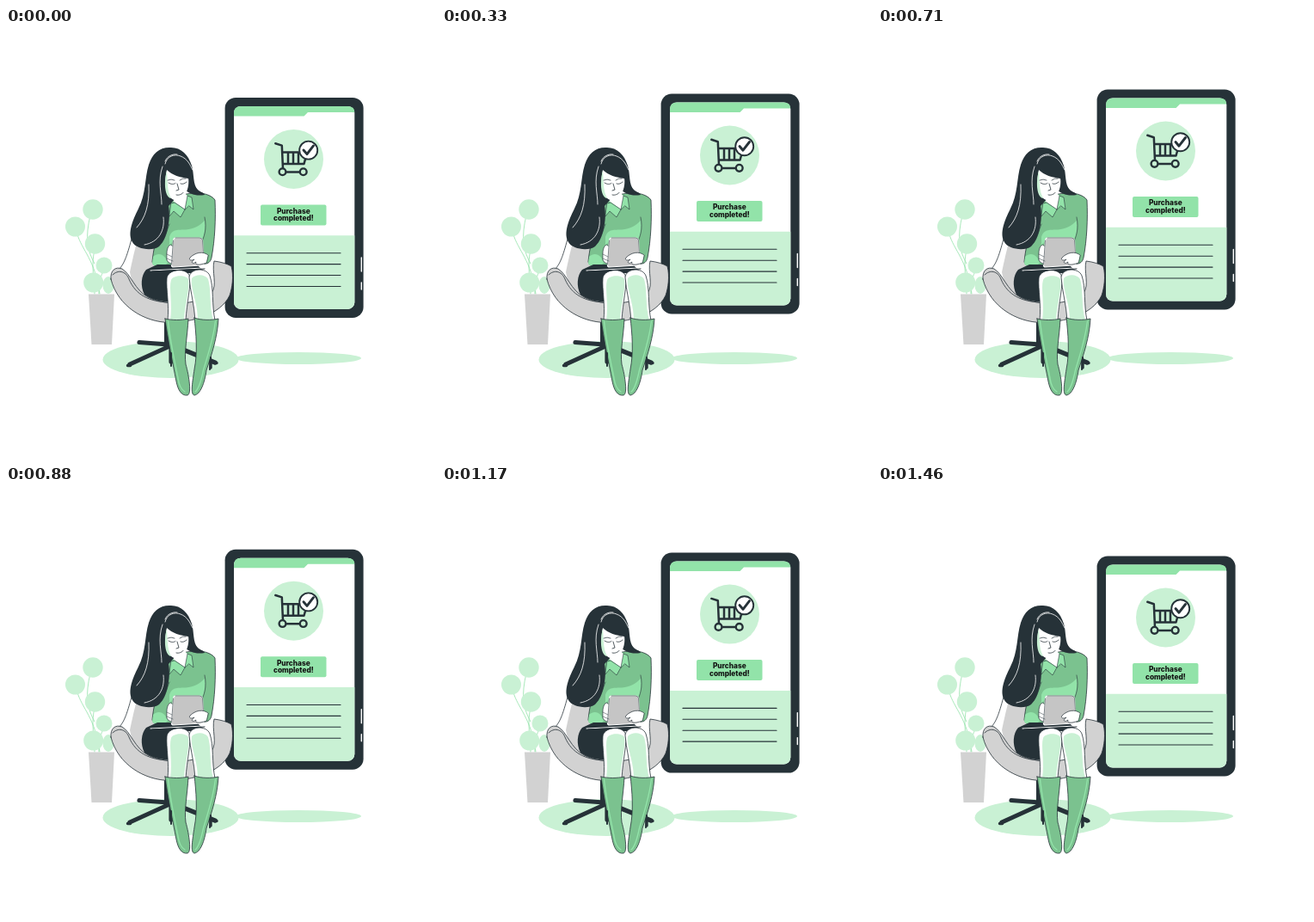
An HTML page with a canvas for the animation above (1.5 s loop, 500 px wide and 500 px high).

```html
<!DOCTYPE html>
<html lang="en">
<head>
<meta charset="utf-8">
<title>Purchase completed</title>
<style>
html, body { margin: 0; width: 100%; height: 100%; overflow: hidden; background: #fff; }
canvas { display: block; width: 500px; height: 500px; }
</style>
</head>
<body>
<canvas id="stage"></canvas>
<script>
const canvas = document.getElementById('stage');
const ctx = canvas.getContext('2d');
const ratio = window.devicePixelRatio || 1;
canvas.width = canvas.height = 500 * ratio;

const INK = '#263238', GREEN = '#92e3a9', PALE = '#c9f1d4', MID = '#7bc28f', GREY = '#d2d2d2', WHITE = '#fff';
const LOOP = 1500, STEPS = 36, RISE = 10, REST = 0.5;

function shape(d, fill, stroke, width = 0.8) {
  const path = new Path2D(d);
  if (fill) { ctx.fillStyle = fill; ctx.fill(path); }
  if (stroke) { ctx.strokeStyle = stroke; ctx.lineWidth = width; ctx.stroke(path); }
}
const line = (d, color = INK, width = 0.8) => shape(d, null, color, width);

function oval(x, y, rx, ry, fill, stroke, width) {
  ctx.beginPath();
  ctx.ellipse(x, y, rx, ry, 0, 0, Math.PI * 2);
  if (fill) { ctx.fillStyle = fill; ctx.fill(); }
  if (stroke) { ctx.strokeStyle = stroke; ctx.lineWidth = width; ctx.stroke(); }
}
const disc = (x, y, r, fill, stroke, width) => oval(x, y, r, r, fill, stroke, width);

function panel(x, y, w, h, r, fill) {
  ctx.beginPath();
  ctx.roundRect(x, y, w, h, r);
  ctx.fillStyle = fill;
  ctx.fill();
}

function drawGround() {
  oval(340, 384, 73, 7, PALE);
  oval(191.5, 385.5, 79, 21.5, PALE);
}

function drawPlant() {
  line('M83 240C88 258 104 270 109 309M98 218C92 243 94 258 103 274M103 258C99 275 102 285 103 309M113 283C108 293 108 300 108 309', GREEN);
  disc(80.5, 231, 11.5, PALE);
  disc(101, 211, 11.7, PALE);
  disc(103.5, 251, 11.7, PALE);
  disc(114, 276, 9.5, PALE);
  disc(101.7, 296, 11.5, PALE);
  oval(119, 299, 6.5, 10, PALE);
  shape('M96 309.5H126L123 368H99.5Z', GREY);
}

function drawCart() {
  line('M313.3 134.3L320.8 136.7L322 163.5M322 144.5H340M322 158H346.5L348.5 151M328 145V157M334 145V157M340 145V157', INK, 2.5);
  line('M325 167.5H342', INK, 2.5);
  disc(321.5, 167.3, 3.9, PALE, INK, 2.4);
  disc(345.7, 167.3, 3.9, PALE, INK, 2.4);
  disc(351.7, 142.2, 10.5, WHITE, INK, 1.9);
  line('M346 142L350 146.7L357.5 137', INK, 2.9);
}

function drawPhone(rise) {
  ctx.save();
  ctx.translate(0, REST - rise);
  panel(254.6, 81, 161, 256, 12.5, INK);
  panel(265, 91, 140.3, 236, 8, WHITE);
  shape('M265 102.5V99Q265 91 273 91H397.3Q405.3 91 405.3 98H351L346.5 102.5Z', GREEN);
  panel(265, 241.3, 140.3, 85.7, [0, 0, 8, 8], PALE);
  line('M413.3 267V283M413.3 296V304', WHITE, 1.4);
  disc(334.5, 152.5, 34.5, PALE);
  drawCart();
  panel(296, 205.5, 76.5, 24, 2, GREEN);
  ctx.fillStyle = '#111';
  ctx.font = '800 8.3px Inter, sans-serif';
  ctx.textAlign = 'center';
  ctx.fillText('Purchase', 334.3, 215.8);
  ctx.fillText('completed!', 334.3, 224.2);
  for (let i = 0; i < 4; i++) line(`M280 ${261.8 + i * 12.9}H389`, INK, 1.1);
  ctx.restore();
}

function drawChair() {
  shape('M184 340H194V365L190 370H184Z', INK);
  line('M155 365.5L188 368M144 391L188 371M192 370V388M191 368L243 389', INK, 5.2);
  line('M141.5 392.5H144.5M238 386V395M243 389.5H245', INK, 3.4);
  shape('M148 238C142 260 139 272 132 280L165 315L187 290L172 250Z', WHITE, INK);
  shape('M152 250C148 264 146 275 144 284C147 300 155 308 165 313L187 290L172 250Z', GREY);
  shape('M122 292C121 282 127 277 135 280C146 287 149 304 165 313C188 324 224 322 239 308C246 299 239 283 242 271C250 272 257 274 262 277C265 289 263 302 260 311C249 334 216 342 190 342.5C161 342 130 324 122 292Z', GREY, INK);
  line('M124 287C130 281 139 282 143 292C151 311 167 318 188 319');
}

function drawBody() {
  shape('M163 281C157 288 156 300 161 310C170 317 184 319 193 318L200 286L231 284L222 275H176Z', INK);
  // legs
  shape('M188 340C190 321 186 304 187 291C188 281 207 278 213 287C216 299 210 319 209 340Z', WHITE, INK);
  shape('M191 340C194 320 189 303 192 293C195 287 209 287 212 292C214 303 208 322 207 340Z', PALE);
  shape('M220 340C219 322 214 305 213 290C214 279 233 278 237 288C242 303 239 321 243 340Z', WHITE, INK);
  shape('M223 340C223 318 214 303 216 291C221 286 231 286 235 292C239 306 236 322 241 340Z', PALE);
  // boots
  shape('M185 338C193 340 204 340 212 338C211 359 207 376 209 391C213 405 216 426 211 427C204 428 200 421 198 411C194 390 188 362 185 338Z', MID, INK);
  line('M188.5 341C191 365 196 387 200 407C201 415 203 420 208 423', GREEN, 1.4);
  shape('M219 337C227 340 239 340 247 338C246 359 239 380 233 398C231 413 226 426 219 427C214 426 217 411 219 397C223 377 221 355 219 337Z', MID, INK);
  line('M243.5 341C241 363 234 382 229.5 398C227 410 224 420 220 423', GREEN, 1.4);
  line('M192 378V393M238 383L237 397', INK, 2);
}

function drawTorso() {
  shape('M186 205C194 196 206 193 218 192C228 191 239 194 243 200C244 222 243 246 239 267C237 277 226 275 222 271L193 276C183 280 172 279 170 272C171 259 176 240 178 222Z', MID, INK);
  shape('M190 243C193 233 201 235 209 234.5C219 234 226 229 231 224C233 236 229 246 226 249V244L196 245L190 254Z', GREEN);
  shape('M171 266C179 259 186 266 188 273C183 279 174 280 170 274Z', GREEN);
  line('M181 250C186 243 187 235 190 228M231 220C234 234 230 244 227 250', INK, 0.6);
  shape('M194 201L208 192L213 198L208 211Z', WHITE);
  shape('M192 204L196 203L208 211L203 220L195 213L190 219Z', GREEN, INK, 0.6);
  shape('M208 211L211 195L216 197L218 211L213 207Z', GREEN, INK, 0.6);
}

function drawHair() {
  shape('M190 139C203 138 212 147 216 160C219 170 217 182 223 188C226 191 230 191 231 194C221 196 213 193 207 187L189 207C192 223 187 246 178 254C170 260 151 257 147 249C141 239 147 224 154 210C163 193 161 175 166 159C170 146 178 139 190 139Z', INK);
  shape('M187 165C184 177 185 190 190 196C195 202 202 202 206 197C212 190 213 180 212 175C203 174 193 171 187 165Z', WHITE);
  shape('M187 166C183 181 185 197 192 198C187 189 188 178 187 166Z', PALE);
  line('M189 180C192 182 195 182 197 180.5M203 181C205 182 208 181 210 179M199 181L201 188L198 189M198 194C201 195 205 193 206 191.5', INK, 0.8);
  line('M188 177Q192 175 196 177M202 177Q206 174 209 175', INK, 0.7);
  line('M185 158C187 149 196 146 203 149C211 152 214 159 217 165M185 155C187 149 194 146 199 147M182 161C176 178 181 192 181 205M166 182C167 206 162 221 152 232M183 220C185 235 178 249 161 252', WHITE, 0.8);
}

function drawTablet() {
  shape('M191 252C186 255 187 263 187 270C190 275 195 275 198 271L195 255Z', WHITE, INK, 0.7);
  shape('M197 244L225 244Q228 244 228.5 247L230 273Q230 276 227 276L195 278Q192 278 192.5 275L194.5 247Q195 244 197 244Z', '#c5c5c5', WHITE, 1.2);
  line('M197 244L225 244Q228 244 228.5 247L230 273M192.5 275L194.5 247', INK, 0.6);
  shape('M235 264C229 259 220 261 214 267C212 270 216 271 219 269C214 273 217 275 221 272C219 276 226 276 233 273Z', WHITE, INK, 0.7);
  line('M187 263L193 266M187 268L194 271', INK, 0.5);
  line('M168 282L230 279', WHITE, 1);
  line('M170 283L231 280', INK, 1);
}

function render(now) {
  const step = Math.floor((now % LOOP + 4.5) * STEPS / LOOP) % STEPS;
  const half = STEPS / 2;
  const rise = RISE * (1 - Math.abs(step + 1 - half) / half);
  ctx.setTransform(ratio, 0, 0, ratio, 0, 0);
  ctx.lineCap = ctx.lineJoin = 'round';
  ctx.fillStyle = WHITE;
  ctx.fillRect(0, 0, 500, 500);
  drawGround();
  drawPlant();
  drawPhone(rise);
  drawChair();
  drawTorso();
  drawBody();
  drawHair();
  drawTablet();
}

let start;
function tick(now) {
  start ??= now;
  render(now - start);
  requestAnimationFrame(tick);
}
render(0);
requestAnimationFrame(tick);
</script>
</body>
</html>
```
